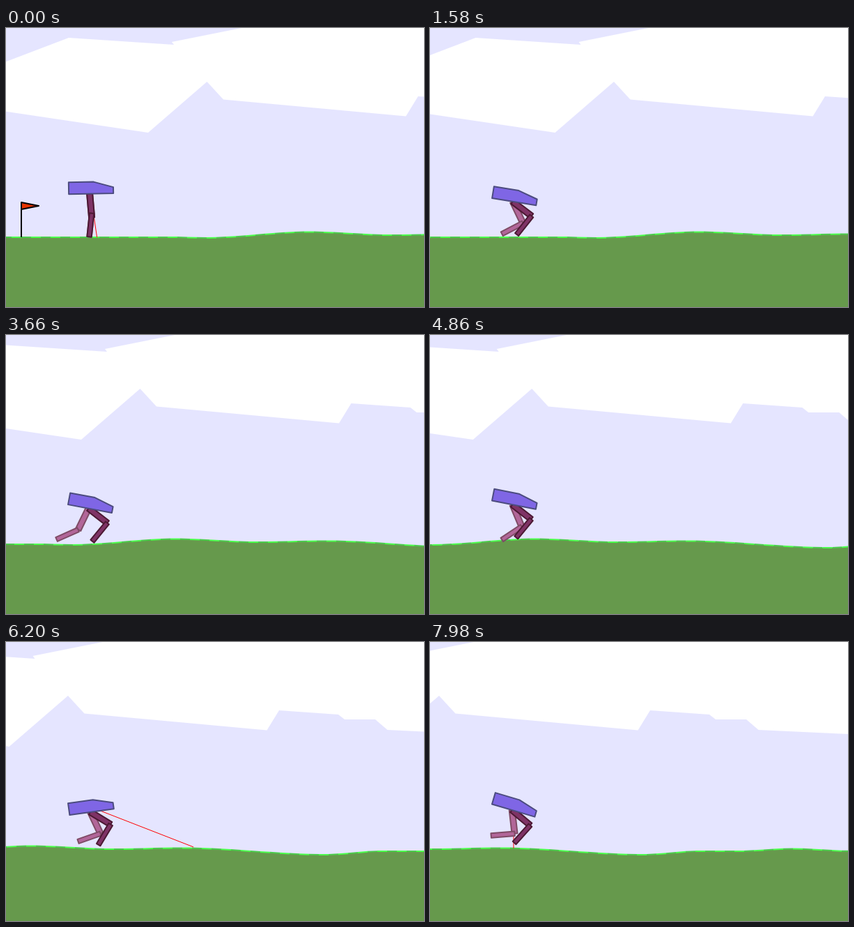
Animation of 600x400 px, one loop 8 s. Source, as an HTML page with a canvas:

```html
<!DOCTYPE html>
<html lang="en">
<head>
<meta charset="utf-8">
<title>Walker</title>
<style>
  html, body { margin: 0; width: 100%; height: 100%; overflow: hidden; background: #e5e5ff; }
  canvas { display: block; }
</style>
</head>
<body>
<canvas id="stage" width="600" height="400"></canvas>
<script>
const ctx = document.getElementById('stage').getContext('2d');
ctx.lineJoin = 'round';

const LOOP = 8000, STEP = 20;
const HULL_X = 120, LIMB = 34, TILE = 14;
const GAIT = 465, PUSH_OFF = 3660, CROUCH = 700;
const RAD = Math.PI / 180;

// Key points: [time, distance], [time, degrees], [x, height of hills and dips]
const SCROLL = [[0, 0], [700, 4], [1580, 49], [2920, 142], [3660, 192], [4860, 284.5], [6200, 399], [7980, 551]];
const TILT = [[0, -1], [700, 9], [4860, 11], [6200, -8], [7980, 16.5]];
const GROUND = [[240, 300], [286, 301], [435, 292.5], [550, 297], [655, 295.5],
  [855, 305], [940, 300], [995, 300], [1070, 296.5], [1160, 300]];

const CLOUDS = [
  [-60, 71], [90, 14], [241, 24], [238, 20], [338, 0], [1000, 0], [1000, 138],
  [747, 126], [729.5, 111], [685.5, 111], [676.5, 104], [591.5, 98],
  [574, 126.5], [312, 102.5], [288.5, 77], [204, 150], [-60, 111]
];
const HULL = [[-30, -9], [6, -9], [34, -1], [34, 8], [-30, 8]];

const lerp = (a, b, u) => a + (b - a) * u;
const clamp01 = v => Math.max(0, Math.min(1, v));
const smooth = u => u * u * (3 - 2 * u);

function segment(keys, x) {
  let i = 0;
  while (i < keys.length - 2 && x >= keys[i + 1][0]) i++;
  return i;
}

function eased(keys, x) {
  const i = segment(keys, x), [xa, a] = keys[i], [xb, b] = keys[i + 1];
  return lerp(a, b, smooth(clamp01((x - xa) / (xb - xa))));
}

// Cubic curve through the distance keys, starting at rest.
function scrollAt(t) {
  const slope = i => {
    if (i === 0) return 0;
    const a = SCROLL[i - 1], b = SCROLL[Math.min(i + 1, SCROLL.length - 1)];
    return (b[1] - a[1]) / (b[0] - a[0]);
  };
  const i = segment(SCROLL, t), [ta, a] = SCROLL[i], [tb, b] = SCROLL[i + 1];
  const d = tb - ta, u = (t - ta) / d, v = 1 - u;
  return lerp(a, b, smooth(u)) + d * u * v * (slope(i) * v - slope(i + 1) * u);
}

// The ground is straight across each tile.
function groundAt(x) {
  const left = Math.floor((x + 20) / TILE) * TILE - 20;
  return lerp(eased(GROUND, left), eased(GROUND, left + TILE), (x - left) / TILE);
}

// Stands upright, sinks into a crouch, then hops on the near leg while the far leg swings.
function poseAt(t, scroll) {
  const phase = 2 * Math.PI * (t - PUSH_OFF) / GAIT;
  const power = clamp01((t - 300) / 800);
  const c = Math.cos(phase) * power, s = Math.sin(phase) * power;
  const crouch = smooth(clamp01(t / CROUCH));
  const tilt = eased(TILT, t);
  return {
    tilt,
    y: groundAt(HULL_X + scroll) - lerp(70.3, 59.5 + 3 * s, crouch),
    far: [lerp(5, -26 * c, crouch), lerp(-6, -66 - 20 * s, crouch)],
    near: [lerp(5, 56 - 0.35 * tilt, crouch), lerp(-6, -34.5 - 0.45 * tilt, crouch)]
  };
}

function trace(points) {
  ctx.beginPath();
  points.forEach(([x, y]) => ctx.lineTo(x, y));
}

function line(points, color, width) {
  trace(points);
  ctx.strokeStyle = color;
  ctx.lineWidth = width;
  ctx.stroke();
}

function shape(points, fill, edge) {
  trace(points);
  ctx.fillStyle = fill;
  ctx.fill();
  if (edge) line([...points, points[0], points[1]], edge, 2);
}

function limb(x, y, angle, half, fill, edge) {
  const s = Math.sin(angle), c = Math.cos(angle);
  const at = (across, along) => [x + across * c + along * s, y - across * s + along * c];
  shape([at(-half, 0), at(half, 0), at(half, LIMB), at(-half, LIMB)], fill, edge);
  return at(0, LIMB);
}

// The shin folds back where the foot would sink into the ground.
function leg(hip, [thigh, shin], slack, scroll, fill, edge) {
  const [x, kneeY] = limb(...hip, thigh * RAD, 4, fill, edge);
  const y = kneeY - slack;
  let angle = shin * RAD;
  const room = groundAt(x + LIMB * Math.sin(angle) + scroll) - 0.5 - y;
  if (LIMB * Math.cos(angle) > room) angle = -Math.acos(clamp01(room / LIMB));
  limb(x, y, angle, 3.2, fill, edge);
}

function drawGround(scroll) {
  const first = Math.floor((scroll + 20) / TILE);
  const knots = Array.from({ length: 45 }, (_, i) => {
    const x = (first + i) * TILE - 20;
    return [x - scroll, eased(GROUND, x)];
  });
  shape([...knots, [640, 410], [-20, 410]], '#66994c');
  for (let i = 1; i < knots.length; i++) {
    line([knots[i - 1], knots[i]], (first + i) % 2 ? '#4cff4c' : '#4ccc4c', 2);
  }
}

// A sensor ray sweeps up and back during the first 20 of every 100 steps.
function drawRay(step, y, scroll) {
  const n = (step + 1) % 100;
  if (n >= 20) return;
  const angle = 0.15 * Math.min(n, 19 - n);
  const dx = Math.sin(angle), dy = Math.cos(angle);
  let reach = 0;
  while (reach < 160 && y + dy * reach < groundAt(HULL_X + dx * reach + scroll)) reach += 0.5;
  line([[HULL_X, y], [HULL_X + dx * reach, y + dy * reach]], '#f00', 1);
}

function drawFlag(x) {
  line([[x, 300], [x, 250]], '#000', 2);
  shape([[x, 250], [x, 260], [x + 25, 255]], '#e53300', '#000');
}

function draw(t) {
  const scroll = scrollAt(t);
  const { y, tilt, far, near } = poseAt(t, scroll);
  const s = Math.sin(tilt * RAD), c = Math.cos(tilt * RAD);
  const onHull = ([px, py]) => [HULL_X + px * c - py * s, y + px * s + py * c];
  const hip = onHull([0, 8]);
  const slack = 6 * clamp01(1 - t / 120);

  ctx.fillStyle = '#e5e5ff';
  ctx.fillRect(0, 0, 600, 400);
  shape(CLOUDS.map(([px, py]) => [px - scroll / 2, py]), '#fff');
  drawGround(scroll);
  drawRay(t / STEP, y, scroll);
  leg(hip, far, slack, scroll, '#b26699', '#7f4c66');
  leg(hip, near, slack, scroll, '#7f3366', '#4c1933');
  shape(HULL.map(onHull), '#7f66e5', '#4c4c7f');
  drawFlag(22 - scroll);
}

const start = performance.now();
function tick() {
  const elapsed = Math.max(0, performance.now() - start) % LOOP;
  draw(Math.floor(elapsed / STEP) * STEP);
  requestAnimationFrame(tick);
}
tick();
</script>
</body>
</html>
```
